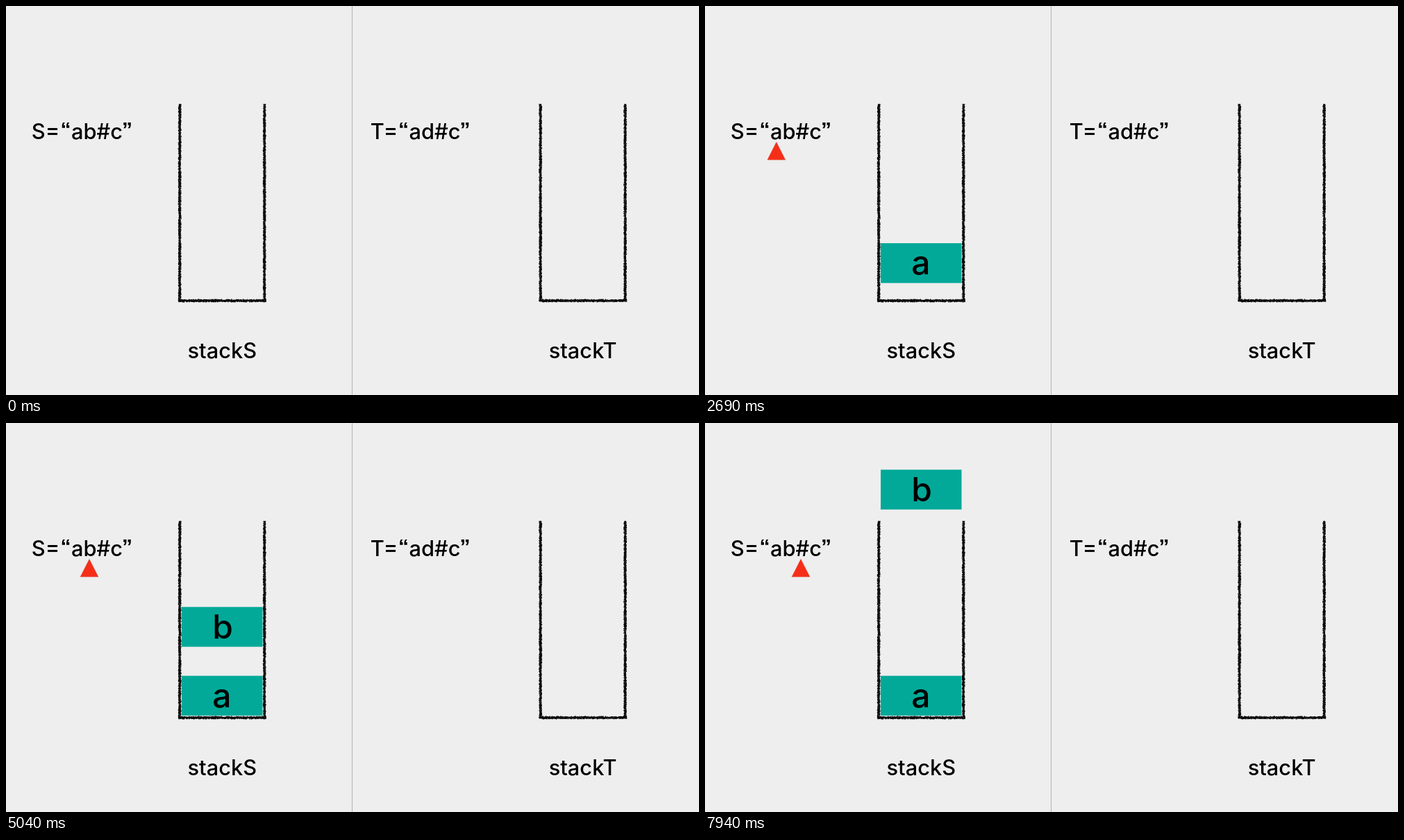
Recreate the animation shown at these times as an HTML page. Size 998 by 561 pixels, loop 7990 ms.

```html
<!DOCTYPE html>
<html lang="en">
<head>
<meta charset="utf-8">
<title>Backspace compare with two stacks</title>
<style>
  html, body { margin: 0; width: 100%; height: 100%; overflow: hidden; background: #eee; }
  svg { display: block; width: 998px; height: 561px; }
  text { font-family: Inter, "Open Sans", sans-serif; text-anchor: middle; }
  .label { font-size: 30.8px; font-weight: 500; }
  .label .quote { font: bold 30px "Liberation Sans", Arial, sans-serif; }
  .block rect { fill: #02a999; }
  .block text { font-size: 48px; font-weight: 550; }
</style>
</head>
<body>
<svg viewBox="0 0 998 561">
  <rect width="998" height="561" fill="#eee"/>
  <path d="M498.5 0V561" stroke="#b2b2b2"/>
  <g id="stacks"></g>
  <g id="labels" class="label"></g>
  <path id="pointer" d="M0 196.5L12.8 221.8H-12.8Z" fill="#f52e18" stroke="#e03a28" stroke-width="0.6"/>
  <g id="a" class="block"><rect x="253" width="116.5" height="57.4"/><text x="311" y="45.2">a</text></g>
  <g id="b" class="block"><rect x="253" width="116.5" height="57.4"/><text x="312" y="45.2">b</text></g>
</svg>
<script>
const LOOP = 7990, STEP = 50, ABOVE = -58;
const $ = id => document.getElementById(id);

let seed = 7;
const rnd = () => (seed = seed * 16807 % 2147483647) / 2147483647;

// A chalky stroke: slices of uneven width along a straight line, with light specks.
function chalk(x, y, length, vertical) {
  let ink = '', specks = '';
  const slice = (along, from, to) => vertical
    ? `M${x + from} ${y + along}H${x + to}`
    : `M${x + along} ${y + from}V${y + to}`;
  for (let i = 0; i < length; i += 1.2) {
    ink += slice(i, -1.2 - rnd() * 1.3, 1.2 + rnd() * 1.3);
    if (rnd() < 0.22) {
      const at = rnd() * 3 - 1.9;
      specks += slice(i, at, at + 0.8);
    }
  }
  return `<path d="${ink}" stroke="#0a0a0a" stroke-width="1.5"/>` +
         `<path d="${specks}" stroke="#777" stroke-width="0.9"/>`;
}

const stack = x =>
  chalk(x, 142, 284, true) + chalk(x + 122, 142, 284, true) + chalk(x - 1, 425, 125, false);
$('stacks').innerHTML = stack(250.2) + stack(769.7);

const word = (x, y, text, kind = '') => `<text x="${x}" y="${y}" class="${kind}">${text}</text>`;

// A name, then its value between raised round quotes, centred on x.
const assign = (nameX, x, name, value) =>
  word(nameX, 192, name + '=') + word(x, 192, value) +
  word(x - 45, 188, '“', 'quote') + word(x + 43.5, 188, '”', 'quote');

$('labels').innerHTML =
  assign(57, 131, 'S', 'ab#c') + assign(544.5, 617.5, 'T', 'ad#c') +
  word(311.3, 508, 'stackS') + word(830.7, 508, 'stackT');

const easeOut = p => 1 - (1 - p) ** 3.2;
const easeInOut = p => (1 - Math.cos(Math.PI * p)) / 2;

// Each move: [start, from, to, ease], lasting 500 ms.
const moves = {
  pointer: [[3690, 102.8, 120, easeInOut], [5640, 120, 138, easeInOut]],
  a: [[2390, ABOVE, 364.6, easeOut]],
  b: [[4790, ABOVE, 304.8, easeOut], [7640, 304.8, ABOVE, easeInOut]]
};

function valueAt(list, t) {
  let value = list[0][1];
  for (const [start, from, to, ease] of list) {
    if (t >= start) value = from + (to - from) * ease(Math.min((t - start) / 500, 1));
  }
  return value;
}

function draw(now) {
  const t = Math.floor((now % LOOP + 10) / STEP) * STEP - 10;
  $('pointer').setAttribute('visibility', t < 740 ? 'hidden' : 'visible');
  $('pointer').setAttribute('transform', `translate(${valueAt(moves.pointer, t)} 0)`);
  for (const id of ['a', 'b']) {
    $(id).setAttribute('transform', `translate(0 ${valueAt(moves[id], t)})`);
  }
}

const begin = performance.now();
function tick() {
  draw(performance.now() - begin);
  requestAnimationFrame(tick);
}
tick();
</script>
</body>
</html>
```
